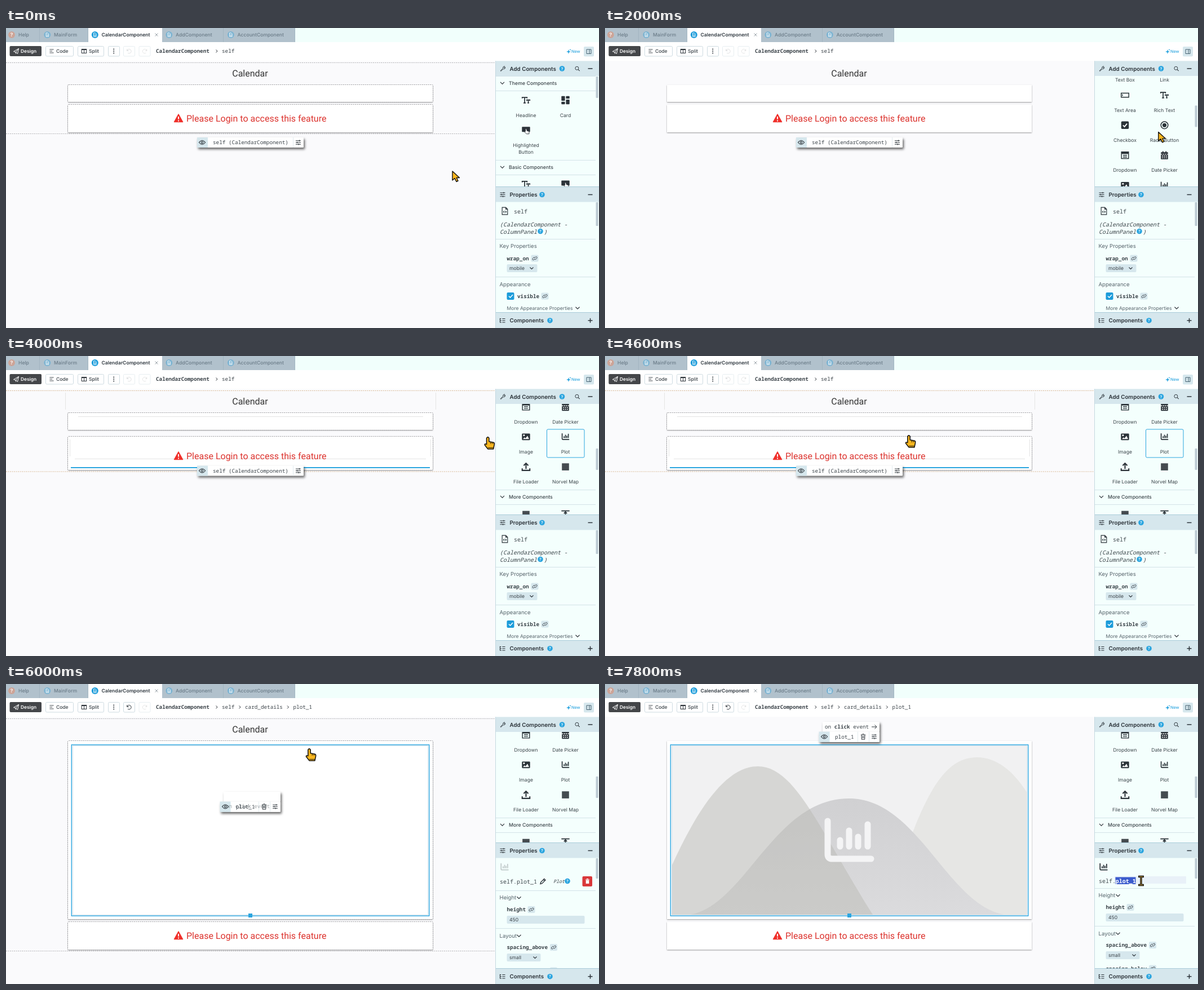
Animation, 1052 px wide and 532 px high, one loop 8 s. Source, as an HTML page:

```html
<!DOCTYPE html>
<html lang="en">
<head>
<meta charset="utf-8">
<title>Component designer</title>
<style>
html, body { margin: 0; width: 100%; height: 100%; overflow: hidden; background: #fafafc; }
#stage { display: block; width: 1052px; height: 532px; text-rendering: geometricPrecision; }
text { white-space: pre; }
</style>
</head>
<body>
<svg id="stage" viewBox="0 0 1052 532"></svg>
<script>
const INK = '#2b3238', BLUE = '#2ba5df', PALE = '#d6e7ed', SIDE = '#f4fffd', LINE = '#d3e2e8';
const UI = 'Inter, sans-serif', MONO = "'Noto Sans Mono', monospace", ROBOTO = 'Roboto, sans-serif';

const rect = (x, y, w, h, fill, extra = '') =>
  `<rect x="${x}" y="${y}" width="${w}" height="${h}" fill="${fill}" ${extra}/>`;
const path = (d, stroke = INK, width = 1.2, fill = 'none', extra = '') =>
  `<path d="${d}" stroke="${stroke}" stroke-width="${width}" fill="${fill}" ${extra}/>`;
const disc = (x, y, r, fill) => `<circle cx="${x}" cy="${y}" r="${r}" fill="${fill}"/>`;
// Text is placed by the middle of its capitals.
const label = (x, y, s, size, { font = UI, weight = 400, fill = '#3c444a', anchor = 'start', extra = '' } = {}) =>
  `<text x="${x}" y="${y + size * .36}" font-family="${font}" font-size="${size}" font-weight="${weight}" fill="${fill}" text-anchor="${anchor}" ${extra}>${s}</text>`;
const mono = (x, y, s, size = 9.3, o = {}) => label(x, y, s, size, { font: MONO, ...o });
const clip = (x, y, w, h, body) =>
  `<svg x="${x}" y="${y}" width="${w}" height="${h}" viewBox="${x} ${y} ${w} ${h}">${body}</svg>`;

const chart = color =>
  path('M395 243V302Q395 310 403 310H472M417 277V288M433 260V288M449 271V288M466 249V288',
    color, 11, 'none', 'stroke-linecap="round"');

// Icons are centred on the origin, about 16 units wide.
const icons = {
  Tt: path('M-7.5 -3.5V-5.5H2V-3.5M-2.7 -5.5V5.5M-5 5.5H-.5M1.5 1V-.5H7.5V1M4.5 -.5V5.5M3 5.5H6', INK, 1.9),
  grid: rect(-8, -8, 7, 9, INK, 'rx="1"') + rect(1, -8, 7, 5, INK, 'rx="1"') +
    rect(-8, 3, 7, 5, INK, 'rx="1"') + rect(1, -1, 7, 9, INK, 'rx="1"'),
  button: rect(-8, -7, 16, 10, INK, 'rx="1"') +
    path('M-1 -3L1 -3L2 1L6 2V7H1L-3 3L-1 2Z', INK, 1, '#fff'),
  box: path('M-7.5 -4H7.5V4H-7.5ZM-5 -1.5V1.5', INK, 1.6),
  link: path('M-1 3L-3 5A3.2 3.2 0 0 1 -7 0L-4 -3A3.2 3.2 0 0 1 1 -1M1 -3L3 -5A3.2 3.2 0 0 1 7 0L4 3A3.2 3.2 0 0 1 -1 1', INK, 1.8),
  check: rect(-7.5, -7.5, 15, 15, INK, 'rx="2"') + path('M-4 0L-1 3L4 -3', '#fff', 2),
  radio: `<circle r="7" fill="none" stroke="${INK}" stroke-width="1.7"/>` + disc(0, 0, 4, INK),
  dropdown: path('M-7 -6.5H7V6.5H-7ZM-4 0H4M-4 3.5H4', INK, 1.6) + rect(-7, -6.5, 14, 4, INK),
  calendar: rect(-7, -6, 14, 14, INK, 'rx="1"') + path('M-3 -8V-4M3 -8V-4', INK, 2) +
    path('M-7 -2H7M-5 1.5H5M-5 5H5', '#fff', 1.5, 'none', 'stroke-dasharray="2.4 1.5"'),
  image: rect(-8, -6.5, 16, 13, INK, 'rx="1.5"') + disc(-4, -3, 1.7, '#fff') + path('M-6 4.5L-3 1L-1 3L3 -2L6 4.5Z', 'none', 0, '#fff'),
  plot: `<g transform="scale(.172) translate(-433 -279)">${chart(INK)}</g>`,
  upload: path('M0 4V-6M-4.5 -2.5L0 -7L4.5 -2.5M-7.5 3V7H7.5V3', INK, 2.3),
  mark: rect(-7, -7, 14, 14, '#454b50'),
  spacer: path('M-8 -7H8M0 -6V8M-3 -2L0 -5L3 -2', INK, 2),
  sliders: path('M-7 -5H7M-7 0H7M-7 5H7M3 -7V-3M-3 -2V2M1 3V7', INK, 1.5),
  tree: path('M-7 -6V5H-3M-7 0H-3M-1 -5H7M-1 0H7M-1 5H7M-8 -5H-4', INK, 1.6),
  wrench: path('M-6 6L1 -1A4 4 0 0 1 6 -6L3.5 -3.5L4 -2L6 -2L7 -4A4 4 0 0 1 2 1L-5 7Z', INK, 1.4),
  search: path('M2.5 2.5L6.5 6.5', INK, 1.7) + `<circle cx="-1" cy="-1" r="4.6" fill="none" stroke="${INK}" stroke-width="1.5"/>`,
  eye: path('M-8 0Q0 -10 8 0Q0 10 -8 0Z', INK, 1.5) + `<circle r="2.4" fill="none" stroke="${INK}" stroke-width="1.5"/>`,
  trash: path('M-6 -5H6M-2 -7H2M-4.5 -5L-4 7H4L4.5 -5M-1.5 -2V4M1.5 -2V4', INK, 1.4),
  file: path('M-6 -8H2L6 -4V8H-6ZM2 -8V-4H6M-1 0L-3 2L-1 4M1 0L3 2L1 4', INK, 1.5),
  pencil: path('M-6 6L-5 2L3 -6L6 -3L-2 5ZM1 -4L4 -1', INK, 1.8),
  undo: path('M-6 -6V-1H-1M-6 -1A6 6 0 1 1 -4 5', INK, 1.6),
  redo: path('M6 -6V-1H1M6 -1A6 6 0 1 0 4 5', INK, 1.6),
  plane: path('M-7 1L7 -7L4 7L-1 3ZM-1 3L7 -7M-1 3V7', '#fff', 1.5),
  lines: path('M-6 -5H6M-6 0H2M-6 5H6', INK, 1.5),
  columns: path('M-7 -6H7V6H-7ZM0 -6V6M-7 -4H7', INK, 1.7),
};
const icon = (name, x, y, scale = .85, extra = '') =>
  `<g transform="translate(${x} ${y}) scale(${scale})" ${extra}>${icons[name]}</g>`;
const chevron = (x, y, r = 3.5, color = INK) => path(`M${x - r} ${y - r / 2}l${r} ${r}l${r} ${-r}`, color, 1.1);
const help = (x, y, color = BLUE, r = 4.8) => disc(x, y, r, color) +
  label(x, y, '?', r * 1.5, { fill: '#fff', weight: 600, anchor: 'middle' });

// Piecewise linear motion through [time, ...values].
function track(keys, t) {
  const i = keys.findIndex(k => k[0] > t);
  if (i < 0) return keys.at(-1).slice(1);
  if (i === 0) return keys[0].slice(1);
  const [a, b] = [keys[i - 1], keys[i]], u = (t - a[0]) / (b[0] - a[0]);
  return a.slice(1).map((v, j) => v + (b[j + 1] - v) * u);
}
const pointerKeys = [[0, 792, 254], [200, 835, 240], [600, 960, 200], [1000, 977, 191], [1400, 977, 191],
  [2400, 985, 180], [2600, 1000, 165], [3000, 1014, 157], [3600, 994, 145], [3800, 960, 145],
  [4600, 539, 141], [5000, 538, 115], [6000, 538, 115], [6800, 940, 261], [7400, 951, 349]];
const scrollKeys = [[600, 0], [1000, 94], [1200, 125], [2400, 334], [3000, 334], [3400, 400]];

const tabs = [[0, 60, 'Help', 22], [60, 146, 'MainForm', 85], [146, 277, 'CalendarComponent', 169.5],
  [277, 386, 'AddComponent', 301], [386, 513, 'AccountComponent', 410.5]];

function topBar(plotAdded) {
  let out = rect(0, 0, 1052, 25, '#f1fffc') + rect(0, 25, 1052, 33.5, '#fff');
  tabs.forEach(([x, end, name, tx], i) => {
    const active = i === 2, cx = tx - 11.7;
    out += rect(x, 0, end - x, 25, active ? '#fff' : '#b1c1cc');
    if (!active) out += rect(end - 1, 0, 1, 25, '#a2b5c1');
    out += i ? disc(cx, 12, 6, active ? '#1c9cda' : '#7db4d2') +
      path(`M${cx - 2.3} 8.8h3l1.7 1.7v4.7h-4.7zM${cx - 1} 12h2.2M${cx - 1} 13.8h2.2`, '#fff', .9)
      : help(10, 12, '#cda497', 6);
    out += label(tx, 12, name, 8.6, { weight: active ? 600 : 500, fill: active ? '#303940' : '#6b7c88' });
  });
  out += path('M264.5 9.5l5 5m0 -5l-5 5', '#89939a', .9);
  out += rect(6.5, 32, 56.5, 18, '#444649', 'rx="2"') + icon('plane', 18, 41, .65) +
    label(26, 41, 'Design', 8.4, { weight: 600, fill: '#fff' });
  [[70, 49], [127, 46], [181, 20], [208, 20], [235.5, 20]].forEach(([x, w], i) =>
    out += rect(x + .5, 32.5, w, 17.5, '#fff', `rx="2" stroke="${i > 3 || (i === 3 && !plotAdded) ? '#e7eef1' : '#cedbe1'}"`));
  out += icon('lines', 81, 41, .6) + label(89, 41, 'Code', 8.5, { weight: 500 }) +
    icon('columns', 138.5, 41, .6) + label(147, 41, 'Split', 8.5, { weight: 500 });
  for (const y of [37.5, 41, 44.5]) out += disc(191.2, y, 1, INK);
  out += icon('undo', 218.5, 41, .62, `opacity="${plotAdded ? 1 : .15}"`) + icon('redo', 246, 41, .62, 'opacity=".12"');
  out += mono(266, 41, 'CalendarComponent', 9.3, { weight: 700 });
  const crumbs = [[383, 'self'], ...(plotAdded ? [[424, 'card_details'], [509.5, 'plot_1']] : [])];
  for (const [x, name] of crumbs)
    out += path(`M${x - 10.5} 38.5l2.5 2.5l-2.5 2.5`, INK, 1) + mono(x, 41, name);
  out += path('M998 38l1 3l3 1l-3 1l-1 3l-1 -3l-3 -1l3 -1z', 'none', 0, BLUE) + disc(1001, 38.5, .9, BLUE) +
    label(1003, 41.5, 'New', 7.2, { fill: BLUE, weight: 500 });
  return out + rect(1025, 33, 18, 17.5, PALE, 'rx="2"') + path('M1030 38h8v7.5h-8zM1035 38v7.5', '#466171', 1);
}

const dashedLine = (y, color) => path(`M0 ${y}H868`, color, 1, 'none', 'stroke-dasharray="2 1.5"');
const card = (y1, y2, dashed) =>
  rect(110, y1, 647, y2 - y1, '#fff', 'style="filter:drop-shadow(0 1px 1px #0006)"') +
  (dashed ? rect(109.5, y1 - .5, 648, y2 - y1 + 1, 'none', 'rx="2" stroke="#a2a2a5" stroke-dasharray="2 1.5"') : '');

function placeholder(opacity) {
  const hill = (d, fill) => path(d, 'none', 0, fill);
  return `<g opacity="${opacity}"><linearGradient id="mid" x2="0" y2="1">
    <stop stop-color="#d0d0d2"/><stop offset="1" stop-color="#dbdbdd"/></linearGradient>` +
    rect(118, 109.5, 631, 299.5, '#f1f1f2') +
    hill('M482 409C548 290 570 130 660 130C695 130 725 155 749 193V409Z', '#e6e6e4') +
    hill('M152 409C250 390 300 203 433 203C555 203 606 390 708 409Z', 'url(#mid)') +
    hill('M118 323C165 220 215 146 271 146C338 146 380 258 475 409H118Z', 'rgb(184 184 178 / .48)') +
    chart('#f4f4f5') + '</g>';
}

const floating = (x, y, w, h) => rect(x, y, w, h, '#fff', 'rx="1" style="filter:drop-shadow(2px 3px 2px #0009)"');

function plotToolbar(dy, settled) {
  const row = 84.5 + dy;
  return floating(386, 67 + dy, 101, 18) + floating(379.5, row, 107.5, 18.5) +
    rect(379.5, row, 19, 18.5, PALE) + icon('eye', 389, 93.5 + dy, .7) +
    mono(408, 93.5 + dy, 'plot_1') + icon('trash', 458, 93.5 + dy, .68) + icon('sliders', 477.5, 93.5 + dy, .62) +
    path(`M448.5 ${row}v18M468.5 ${row}v18`, '#e2ebef', 1) +
    mono(390, settled ? 76 + dy : row + 8.5, 'on <tspan font-weight="700">click</tspan> event', 9.3, { extra: `opacity="${settled ? 1 : .45}"` }) +
    (settled ? path(`M473 ${76 + dy}h9m-3.5 -3.5l3.5 3.5l-3.5 3.5`, INK, 1) : '');
}

function canvasArea(t, [px, py]) {
  const hovered = px < 868, plotAdded = t >= 5800;
  const dragging = hovered && t >= 4000 && t < 5400;
  const intoFirst = dragging && py < 136;
  let bounds = [131, 136, 185, 187.5];
  if (plotAdded) bounds = [417, 422, 471, 473.5];
  else if (t >= 5400) bounds = [334, 339, 388, 390.5];
  else if (intoFirst) bounds = [148, 153, 202, 205];
  else if (dragging) bounds = [131, 143, 202, 205];
  const [end1, top2, end2, end] = bounds;
  const textY = dragging ? 177.5 : (top2 + end2) / 2;

  let out = rect(0, 58.5, 868, 473.5, '#fafafc');
  if (hovered) for (const y of [61.5, end]) out += dashedLine(y, dragging ? '#d8b995' : '#b1b1b4');
  out += label(433, 80, 'Calendar', 16, { font: ROBOTO, fill: '#333', anchor: 'middle' });
  out += card(101, end1, hovered) + card(top2, end2, hovered);
  if (dragging) {
    out += path('M105.5 65V95M762.5 65V95M128 107.5H740', '#e4e4e4', 1);
    out += intoFirst ? path('M115 118H752', BLUE, 2)
      : path('M113.5 148V178M753.5 148V178M122 182.5H745', '#e4e4e4', 1) + path('M115 198H752', BLUE, 2);
  }
  out += path(`M306 ${textY - 7.5}L313.5 ${textY + 6}H298.5Z`, '#f0302b', 1.5, '#f0302b', 'stroke-linejoin="round"') +
    path(`M306 ${textY - 3.5}v4.8m0 1.8v1.9`, '#fff', 1.9) +
    label(320, textY, 'Please Login to access this feature', 16, { font: ROBOTO, fill: '#dc322d' });
  if (!plotAdded) {
    const dy = dragging ? .5 : 0;
    return out + floating(339, 194 + dy, 189, 18) + rect(339, 194 + dy, 19, 18, PALE) +
      icon('eye', 348, 203 + dy, .7) + mono(367, 203 + dy, 'self (CalendarComponent)') +
      path(`M509.5 ${194 + dy}v18`, '#e2ebef', 1) + icon('sliders', 518.5, 203 + dy, .65);
  }
  out += placeholder(track([[6000, 0], [6400, 1]], t)[0]) +
    rect(118.5, 109.5, 630, 300, 'none', 'stroke="#cfe0ea"') +
    rect(116.3, 107.8, 634.4, 303.4, 'none', `stroke="${BLUE}" stroke-width="1.4"`) + rect(430, 407, 7, 7, BLUE);
  return out + plotToolbar(t < 6200 ? 124 : 0, t >= 6200);
}

const sections = [[85, 'Theme Components'], [234, 'Basic Components'], [637, 'More Components']];
const basic = [['Label', 'Tt'], ['Button', 'button'], ['Text Box', 'box'], ['Link', 'link'],
  ['Text Area', 'box'], ['Rich Text', 'Tt'], ['Checkbox', 'check'], ['Radio Button', 'radio'],
  ['Dropdown', 'dropdown'], ['Date Picker', 'calendar'], ['Image', 'image'], ['Plot', 'plot'],
  ['File Loader', 'upload'], ['Norvel Map', 'mark']];
const items = [['Headline', 'Tt', 922.5, 128], ['Card', 'grid', 992.5, 128], ['Highlighted|Button', 'button', 922.5, 181.5],
  ...basic.map(([name, sign], i) => [name, sign, i % 2 ? 992.5 : 922.5, 276.8 + 53.3 * (i >> 1)]),
  ['', 'mark', 922.5, 681], ['', 'spacer', 992.5, 681]];

function hoveredItem(t) {
  if (t >= 2600 && t <= 3000) return 'Date Picker';
  if (t > 3000 && t < 5400) return 'Plot';
  return t === 6800 ? 'File Loader' : null;
}

function componentList(t) {
  const scroll = track(scrollKeys, t)[0], active = hoveredItem(t), dragged = t >= 3800 && t < 5400;
  let out = '';
  for (const [y, name] of sections)
    out += rect(869, y, 177, 1, LINE) + rect(869, y + 26, 177, 1, LINE) + chevron(880.5, y + 12.7) +
      label(892, y + 12.7, name, 8.8, { weight: 500 });
  for (const [name, sign, x, y] of items) {
    if (name === active) out += rect(x - 33, y - 13.3, 66.5, 50, dragged ? SIDE : PALE, `rx="2" ${dragged ? `stroke="${BLUE}"` : ''}`);
    out += icon(sign, x, y, .9);
    name.split('|').forEach((s, i) => out += label(x, y + 26.6 + i * 11.5, s, 8.6, { anchor: 'middle' }));
  }
  return clip(869, 85, 183, 196, `<g transform="translate(0 ${-scroll})">${out}</g>` +
    rect(1046.5, 86 + scroll * .195, 4, 38, '#bccbd3', 'rx="1"'));
}

const badge = (x, y) => rect(x - 6.5, y - 6, 13, 12, PALE, 'rx="2"') + icon('link', x, y, .5);
const select = (y, w, s, arrow) => rect(888.5, y - 7, w, 14, PALE, 'rx="2"') + label(893, y, s, 8.6) +
  (arrow ? chevron(arrow, y, 3) : '');
const property = (y, name, bx) => mono(888.5, y, name, 9.3, { weight: 600 }) + badge(bx, y);
const heading = (y, s, arrow) => label(875.5, y, s, 9.6, { fill: '#59656d' }) + (arrow ? chevron(arrow, y, 3.5) : '');
const italic = 'font-style="italic"';

function selfProperties() {
  return icon('file', 885, 324.5, .8) + mono(901, 325, 'self', 10) +
    mono(876, 348, '(CalendarComponent -', 10, { extra: italic }) + mono(876, 361, 'ColumnPanel', 10, { extra: italic }) +
    help(948, 360.5) + mono(954, 361, ')', 10, { extra: italic }) + rect(869, 374, 177, 1, LINE) +
    heading(387, 'Key Properties') + property(408.5, 'wrap_on', 938) + select(426, 54, 'mobile', 932.5) +
    rect(869, 441, 177, 1, LINE) + heading(454.5, 'Appearance') +
    rect(888.5, 469, 13, 13, '#1c9cda', 'rx="2"') + path('M892 475.5l2.5 2.5l4.5 -5', '#fff', 1.5) +
    mono(907, 475.5, 'visible', 9.3, { weight: 600 }) + badge(956, 475.5) +
    label(888.5, 496.5, 'More Appearance Properties', 8.6, { fill: '#59656d' }) + chevron(1014, 496.5);
}

function plotProperties(t) {
  const editing = t >= 7600, dy = editing ? -4 : 0;
  let out = icon('plot', 884.5, 324.5, .95, `opacity="${t < 6200 ? .25 : 1}"`);
  out += editing
    ? rect(904, 341, 127, 13, '#e9f1f8') + rect(905.5, 342.5, 36, 12.5, '#3b5bcd') + mono(876, 349, 'self.', 10) +
      mono(905.7, 349, 'plot_1', 10, { fill: '#fff', weight: 600 })
    : mono(876, 350.5, 'self.plot_1', 10) + icon('pencil', 952.5, 350, .75) +
      mono(971, 350, 'Plot', 8.4, { extra: italic }) + help(996, 349.5) +
      rect(1022.5, 341, 17.5, 18, '#d9383a', 'rx="2"') +
      path('M1028 347h7M1030 345.7h3', '#fff', 1.2) + rect(1028.7, 348, 5.6, 6, '#fff');
  return out + `<g transform="translate(0 ${dy})">` + rect(869, 366, 177, 1, LINE) + heading(379, 'Height', 910) +
    property(400, 'height', 932) + select(418, 138, '450') + rect(869, 433, 177, 1, LINE) +
    heading(446.5, 'Layout', 910) + property(467, 'spacing_above', 971.5) + select(485, 60, 'small', 938.5) +
    property(508.5, 'spacing_below', 971.5) + '</g>';
}

function sidebar(t) {
  const header = (y, h, cy, sign, name, qx) => rect(868, y, 184, h, PALE) + icon(sign, 881, cy, .65) +
    label(893.5, cy, name, 9.8, { weight: 600, fill: INK }) + help(qx, cy) + path(`M1032.5 ${cy}h8`, INK, 1.5);
  const plotAdded = t >= 5800;
  return rect(868, 58.5, 184, 473.5, SIDE) + componentList(t) +
    clip(869, 308, 183, 196, (plotAdded ? plotProperties(t) : selfProperties()) +
      rect(1046.5, 309, 4, plotAdded ? 36 : 42, '#bccbd3', 'rx="1"')) +
    header(58.5, 26.5, 72, 'wrench', 'Add Components', 986.5) + icon('search', 1013.5, 72, .65) +
    header(281.5, 27, 295.5, 'sliders', 'Properties', 951) + rect(868, 281, 184, 1, '#a9cbd9') +
    header(504.5, 27.5, 518.7, 'tree', 'Components', 965) + rect(868, 504, 184, 1, '#a9cbd9') +
    path('M1036.5 514.7v8', INK, 1.5) + rect(868, 58.5, 1, 473.5, '#c4d8e0');
}

function pointer(t, [x, y]) {
  let shape;
  if (t >= 7600) shape = path('M-5 -7.5H5M0 -7.5V7.5M-5 7.5H5', '#111', 3.4) + path('M-4 -7.5H4M0 -7.5V7.5M-4 7.5H4', '#d9a53a', .8);
  else if (t < 2600) shape = path('M0 0V16L4 12.5L7 18.5L10 17L7.2 11.5H12.5Z', '#111', 1.4, '#f9b61e', 'stroke-linejoin="round"');
  else shape = '<g transform="scale(1.1)">' +
    path('M-2 1.5Q0 -2 2 1.5V7L9 8.5Q11 9 10.5 12L9 19H0L-5 12.5Q-5.5 10 -2 11.5Z', '#111', 1.4, '#f9b61e', 'stroke-linejoin="round"') +
    path('M4.8 8V11M7.6 8.5V11M0 17H9', '#111', .9) + '</g>';
  return `<g transform="translate(${x} ${y})">${shape}</g>`;
}

const stage = document.getElementById('stage');
let shown = -1;
function tick(now) {
  const t = Math.floor(now % 8000 / 200) * 200;
  if (t !== shown) {
    shown = t;
    const at = track(pointerKeys, t);
    stage.innerHTML = canvasArea(t, at) + topBar(t >= 5800) + sidebar(t) + pointer(t, at);
  }
  requestAnimationFrame(tick);
}
tick(performance.now());
</script>
</body>
</html>
```
